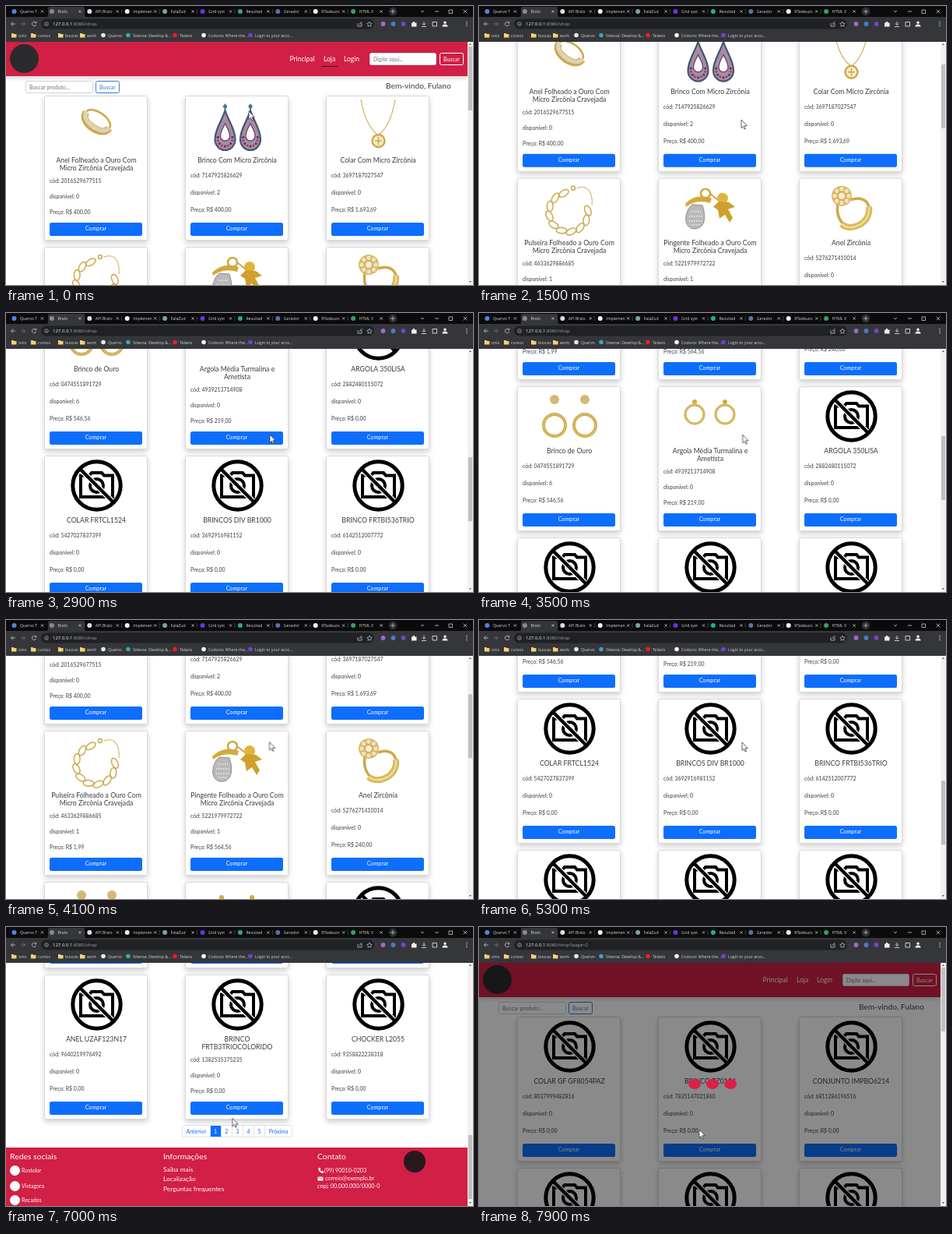
Animation, 600 px wide and 358 px high, one loop 8000 ms. Source, as an HTML page:

```html
<!DOCTYPE html>
<html lang="pt-BR">
<head>
<meta charset="utf-8">
<title>Loja</title>
<style>
@property --s { syntax: "<number>"; inherits: true; initial-value: 0; }
html, body { margin: 0; width: 100%; height: 100%; overflow: hidden; background: #fff; }
#stage { position: absolute; left: 0; top: 0; width: 600px; height: 358px; overflow: hidden;
  font-family: Lato, "Open Sans", sans-serif; color: #383d43; animation: scroll 8s infinite; }
#stage div, #stage span, #stage svg { position: absolute; box-sizing: border-box; }
span { white-space: nowrap; line-height: 10px; margin-top: -5px; }
.mid { transform: translateX(-50%); }
.view { inset: 0 7px 0 0; clip-path: inset(45px 0 0); background: #fff; }
.page { inset: 0; transform: translateY(calc(var(--s) * -1px)); }
.first { animation: first 8s step-end infinite; }
.second { animation: second 8s step-end infinite; }

.head { left: 0; top: 45px; width: 593px; height: 45px; background: #d11f45; color: #fff; box-shadow: 0 2px 6px #0003; }
.field { border: .6px solid #ced4da; border-radius: 2.5px; background: #fff; }
.btn { border: .8px solid; border-radius: 2.5px; font-size: 7px; line-height: 14px; text-align: center; }
.card { width: 133px; height: 186px; border: .6px solid #d9d9dc; border-radius: 2.5px; background: #fff; box-shadow: 0 3px 7px #0003; }
.buy { left: 5.9px; top: 162.4px; width: 119px; height: 16.4px; border-radius: 2.5px; background: #0d6efd;
  color: #fff; font-size: 7.2px; line-height: 16px; text-align: center; }
.art { left: 0; top: 0; fill: none; }
.pager { left: 226px; top: 1084px; display: flex; width: 142px; height: 16px; border: .6px solid #dee2e6; border-radius: 2.5px; overflow: hidden; }
.pager b { flex: 1 0 auto; font: 7px/15px Lato, sans-serif; text-align: center; color: #0d6efd; border-left: .6px solid #dee2e6; }
.pager b:first-child { border: 0; }
.pager .on { background: #0d6efd; color: #fff; }
.foot { left: 0; top: 1113px; width: 593px; height: 80px; background: #d11f45; color: #fff; }
.shade { inset: 45px 0 0; background: rgba(0, 0, 0, .46); }
.dot { top: 194.5px; width: 16px; height: 13px; border-radius: 50%; background: #dc1f45; }
.bar { left: 593px; top: 45px; width: 7px; height: 313px; background: #f1f1f1; }
.thumb { left: 1px; top: 7px; width: 5px; height: 82px; background: #bfbfbf; transform: translateY(calc(var(--s) * .259px)); }
.cursor { left: 0; top: 0; overflow: visible; animation: cursor 8s infinite; }
.chrome { left: 0; top: 0; font: 5.2px "Open Sans", "Noto Sans", sans-serif; }

@keyframes scroll {
  0%     { --s: 0; animation-timing-function: step-end; }
  5%     { --s: 0; animation-timing-function: steps(5); }
  11.25% { --s: 60; animation-timing-function: steps(6); }
  18.75% { --s: 88.3; animation-timing-function: steps(4); }
  23.75% { --s: 140; animation-timing-function: steps(5); }
  30%    { --s: 380; animation-timing-function: steps(5); }
  36.25% { --s: 514; animation-timing-function: steps(3); }
  40%    { --s: 530; animation-timing-function: steps(9); }
  51.25% { --s: 167; animation-timing-function: steps(2); }
  53.75% { --s: 155; animation-timing-function: steps(10); }
  66.25% { --s: 596; animation-timing-function: steps(6); }
  73.75% { --s: 818; animation-timing-function: steps(1); }
  75%    { --s: 830; animation-timing-function: step-end; }
  92.5%, 100% { --s: 0; animation-timing-function: step-end; }
}
@keyframes cursor {
  0%     { transform: translate(312px, 135px); animation-timing-function: steps(9); }
  11.25% { transform: translate(336px, 146px); animation-timing-function: steps(6); }
  18.75% { transform: translate(337px, 146px); animation-timing-function: steps(14); }
  36.25% { transform: translate(339px, 156px); animation-timing-function: steps(24); }
  66.25%, 80% { transform: translate(338px, 157px); animation-timing-function: steps(7); }
  88.75%, 100% { transform: translate(283px, 260px); }
}
@keyframes first { 0% { visibility: visible; } 92.5%, 100% { visibility: hidden; } }
@keyframes second { 0% { visibility: hidden; } 92.5%, 100% { visibility: visible; } }
</style>
</head>
<body>
<div id="stage"></div>
<script>
const span = (x, y, size, text, cls = '', color = '') =>
  `<span class="${cls}" style="left:${x}px;top:${y}px;font-size:${size}px;color:${color}">${text}</span>`;
const box = (cls, x, y, w, h, inner = '', extra = '') =>
  `<div class="${cls}" style="left:${x}px;top:${y}px;width:${w}px;height:${h}px;${extra}">${inner}</div>`;
const repeat = (n, f) => Array.from({ length: n }, (_, i) => f(i)).join('');
const circle = (x, y, r, attrs) => `<circle cx="${x}" cy="${y}" r="${r}" ${attrs}/>`;
const path = (d, attrs) => `<path d="${d}" ${attrs}/>`;

const gold = 'stroke="#cda94c"';

const drop = x =>
  path(`M${x} 9l3 4-3 4-3-4z`, 'fill="#3f7f95"') +
  path(`M${x} 18C${x + 4} 31 ${x + 13} 42 ${x + 13} 55A13 14 0 0 1 ${x - 13} 55C${x - 13} 42 ${x - 4} 31 ${x} 18z`,
    'fill="#a58ca6" stroke="#43566e" stroke-width="2.2"') +
  path(`M${x} 35c3 6 6 10 6 16a6 6 0 0 1-12 0c0-6 3-10 6-16z`, 'fill="#fff" stroke="#6b3f63" stroke-width="1.3"') +
  repeat(9, i => {
    const a = (i * 25 - 10) * Math.PI / 180;
    return circle(x + 9.4 * Math.cos(a), 54 + 10 * Math.sin(a), 1.5, `fill="${i % 2 ? '#b8336f' : '#57334f'}"`);
  });

const hoop = (x, y, r, w) => circle(x, y, r, `${gold} stroke-width="${w}"`) +
  circle(x, y, r, 'stroke="#f3dfa0" stroke-width="1.4" stroke-dasharray="1 1.6"');

const art = {
  none: () => circle(66.5, 37.5, 30.7, 'stroke="#000" stroke-width="5"') +
    path('M46 24.500H57L60 21H73L76 24.500H87V52H46z', 'stroke="#000" stroke-width="4"') +
    circle(66.5, 37.5, 8.5, 'stroke="#000" stroke-width="4"') +
    path('M48 19L85 56', 'stroke="#fff" stroke-width="7"') +
    path('M45 16L88 59', 'stroke="#000" stroke-width="4.4"'),
  band: () => '<g transform="rotate(35 66 33)">' +
    `<ellipse cx="66" cy="29" rx="18" ry="9" ${gold} stroke-width="2.5"/>` +
    path('M48 30C48 46 84 46 84 30', 'stroke="#cda94c" stroke-width="9"') +
    path('M48 29C48 44 84 44 84 29', 'stroke="#e4e2dc" stroke-width="5.5" stroke-dasharray="1.6 .6"') + '</g>',
  drops: () => drop(50.5) + drop(83),
  chain: () => path('M44 4C48 28 56 42 66 50C77 42 84 28 88 4', `${gold} stroke-width="1.1"`) +
    circle(66.5, 57, 8, `${gold} stroke-width="2.4" fill="#f6ebc9"`) +
    path('M62 57h9M66.500 52v10', `${gold} stroke-width="1.5"`),
  bracelet: () => repeat(10, i =>
    `<ellipse rx="6.8" ry="3.8" transform="translate(65 43) rotate(${i * 29 - 5}) translate(25 0) rotate(72)"
      ${gold} stroke-width="1.5"/>`) +
    path('M76 12Q90 7 94 21Q96 28 95 34', `${gold} stroke-width="1.3" stroke-dasharray="2 .8"`) +
    circle(71, 12, 2.5, `${gold} stroke-width="1.4"`),
  pacifier: () => path('M34 32Q48 18 68 25L66 31Q48 26 35 36z', 'fill="#d4aa35"') +
    circle(60, 19, 6, `${gold} stroke-width="2.6"`) +
    path('M43 33C34 40 30 60 43 64C58 66 62 52 56 34z', 'fill="#b9b9ba" stroke="#8c8c8e"') +
    path('M41 42h13M39 48h18M39 54h18M42 59h12', 'stroke="#eee" stroke-width="1.5" stroke-dasharray="1.5 1.5"') +
    path('M66 19L77 28', `${gold} stroke-width="2"`) +
    circle(82, 25, 7, 'fill="#dfb63d"') +
    path('M77 29L70 36L76 40L78 51L85 46L91 56L95 50L89 39L98 36L90 30z', 'fill="#cfa02d"'),
  flower: () => path('M49 32C46 50 56 64 70 63C88 60 96 44 86 30C82 25 74 24 66 27', `${gold} stroke-width="3.5"`) +
    path('M54 58C64 69 92 58 89 36', 'stroke="#d8b85c" stroke-width="8"') +
    path('M54 58C64 69 92 58 89 36', 'stroke="#f0dc94" stroke-width="2.5"') +
    circle(54, 22, 13, 'fill="#dfbd62"') +
    repeat(8, i => circle(54 + 9 * Math.cos(i * .785), 22 + 9 * Math.sin(i * .785), 3.4, 'fill="#f1e2bd" stroke="#c79d3c" stroke-width=".7"')) +
    circle(54, 22, 4.5, 'fill="#f5edda" stroke="#c79d3c" stroke-width=".7"'),
  studs: () => [47, 86].map(x => circle(x, 16, 6, 'fill="#d5b878"') + hoop(x, 49, 14, 4)).join(''),
  hoops: () => [46, 85].map(x => circle(x, 19, 3, 'fill="#d4aa3c"') + hoop(x, 35, 12, 3)).join(''),
};

const plated = ' Folheado a Ouro Com|Micro Zircônia Cravejada';
const shop = [
  ['Anel' + plated, '2016529677515', 0, '400,00', 'band'],
  ['Brinco Com Micro Zircônia', '7147925826629', 2, '400,00', 'drops'],
  ['Colar Com Micro Zircônia', '3697187027547', 0, '1.693,69', 'chain'],
  ['Pulseira' + plated, '4633629886685', 1, '1,99', 'bracelet'],
  ['Pingente' + plated, '5221979972722', 1, '564,56', 'pacifier'],
  ['Anel Zircônia', '5276271410014', 0, '240,00', 'flower'],
  ['Brinco de Ouro', '0474551891729', 6, '546,56', 'studs'],
  ['Argola Média Turmalina e|Ametista', '4939213714908', 0, '219,00', 'hoops'],
  ['ARGOLA 350LISA', '2882480115072'],
  ['COLAR FRTCL1524', '5427027837399'],
  ['BRINCOS DIV BR1000', '3692916981152'],
  ['BRINCO FRTBI536TRIO', '6142512007772'],
  ['ANEL UZAF123N17', '9640219976492'],
  ['BRINCO|FRTB3TRIOCOLORIDO', '1382535375235'],
  ['CHOCKER L2055', '9358822238318'],
];
const shop2 = [
  ['COLAR GF GF8054PAZ', '8037999482816'],
  ['BRINCO BZ0124', '7835147021860'],
  ['CONJUNTO IMPBO6214', '6811286196516'],
  ['COLAR GF GF8061', '8037999482823'],
  ['BRINCO BZ0130', '7835147021877'],
  ['CONJUNTO IMPBO6220', '6811286196523'],
];

function card([name, code, stock = 0, price = '0,00', kind = 'none'], i) {
  const lines = name.split('|');
  const ys = lines.length > 1 ? [108.2, 128, 147.8] : [101, 123, 145.2];
  const facts = [`cód: ${code}`, `disponível: ${stock}`, `Preço: R$ ${price}`];
  return box('card', 49 + i % 3 * 181, 115 + Math.floor(i / 3) * 194, 133, 186,
    `<svg class="art" width="133" height="75">${art[kind]()}</svg>` +
    lines.map((t, k) => span(66, 81.5 + k * 10.2, 8.7, t, 'mid')).join('') +
    facts.map((t, k) => span(6.1, ys[k], 6.9, t)).join('') +
    '<div class="buy">Comprar</div>');
}

const header = active => `<div class="head">
  ${box('', 5, 4, 37, 37, '', 'border-radius:50%;background:#2b2a2c')}
  ${span(364.5, 22.5, 8.5, 'Principal')}${span(408, 22.5, 8.5, 'Loja')}${span(434, 22.5, 8.5, 'Login')}
  ${active ? box('', 405, 31.5, 22, 1, '', 'background:#4a1420') : ''}
  ${box('field', 467, 14.5, 86, 16)}${span(472, 22.5, 7, 'Digite aqui...', '', '#70767c')}
  ${box('btn', 557, 14.5, 31, 16, 'Buscar')}</div>
  ${box('field', 25, 96, 86.5, 16)}${span(30, 104, 7, 'Buscar produto...', '', '#70767c')}
  ${box('btn', 115, 96, 31, 16, 'Buscar', 'color:#3d7fc9')}
  ${span(488, 102, 10.2, 'Bem-vindo, Fulano')}`;

const social = (y, name) =>
  box('', 5, y - 6.5, 13, 13, '', 'border-radius:50%;background:#fff') + span(20, y, 7, name);

const footer = `<div class="foot">
  ${span(5, 10.5, 10.4, 'Redes sociais')}${span(202, 10.5, 10.4, 'Informações')}${span(400, 10.5, 10.4, 'Contato')}
  ${social(29, 'Rostolar')}${social(49, 'Vistagora')}${social(67, 'Recados')}
  ${['Saiba mais', 'Localização', 'Perguntas frequentes'].map((t, i) => span(202, 27.5 + i * 12.5, 8.4, t)).join('')}
  <svg width="593" height="60" fill="#fff">
    <path d="M401 27l2-1.5 1.4 2-1 1.2 2 2 1.2-1 2 1.4-1.5 2q-5-1-6.1-6.1zM400.500 37.500h7v5h-7z"/>
    <path d="M400.500 37.500l3.500 3 3.500-3" fill="none" stroke="#d11f45" stroke-width=".7"/>
  </svg>
  ${span(409, 29.5, 7.2, '(99) 90010-0203')}${span(410, 40, 7.2, 'correio@exemplo.br')}${span(400, 49.5, 7.2, 'cnpj: 00.000.000/0000-0')}
  ${box('', 511, 4, 28, 28, '', 'border-radius:50%;background:#29191d')}</div>`;

const pager = '<div class="pager">' + ['Anterior', 1, 2, 3, 4, 5, 'Próxima']
  .map(t => `<b class="${t === 1 ? 'on' : ''}">${t}</b>`).join('') + '</div>';

// Browser frame
const label = (x, y, text) => `<text x="${x}" y="${y}" fill="#d5d6d8">${text}</text>`;
const line = (d, color = '#c9cacc') => path(d, `fill="none" stroke="${color}" stroke-width=".8"`);
const cross = (x, y, r) => line(`M${x - r} ${y - r}l${2 * r} ${2 * r}M${x + r} ${y - r}l${-2 * r} ${2 * r}`);

const tabs = [['Quervo T', '#4c86e8'], ['Bralo', '#8a8a8a'], ['API Bralo', '#dddddd'], ['Implemen', '#f2f2f2'],
  ['FalaZud', '#74aa9c'], ['Grid syst', '#6f2cf3'], ['Resultad', '#20b08b'], ['Gerador', '#5374a8'],
  ['RTadeuzo', '#f2f2f2'], ['HTML V', '#2fa36b']];
const tabBar = tabs.map(([name, color], i) => {
  const x = 10.5 + i * 48.4;
  return circle(x, 7, 3, `fill="${color}"`) + label(x + 7.5, 9, name) +
    cross(x + 36, 7, 1.6) + (i > 1 ? line(`M${x - 7} 4v6`, '#4b4c50') : '');
}).join('');

const folders = [[10, 'onix'], [35, 'cursos'], [70, 'buscas'], [98, 'work']].map(([x, t]) =>
  path(`M${x - 3} 35h2.500l1 1h3v4.500h-6.500z`, 'fill="#f3d272"') + label(x + 6, 39.5, t)).join('');
const links = [[125, 'Quervo', '#e8e8e8'], [157, 'Sitevoa: Develop &amp;...', '#32a9b5'], [217, 'Telavix', '#f01d1d'],
  [254, 'Coduno: Where the...', '#f2f2f2'], [314, 'Login to your acco...', '#7441d8']].map(([x, t, c]) =>
  circle(x, 37.5, 2.8, `fill="${c}"`) + label(x + 6, 39.5, t)).join('');

const badges = ['#a06ad0', '#4a7bd0', '#7446c8'].map((c, i) => circle(484.5 + i * 13, 23, 2.9, `fill="${c}"`)).join('');

const address = `<rect x="45" y="16.500" width="428" height="13" rx="6.500" fill="#202124"/>` +
  line('M12 23H6.500M9 20.500L6.500 23 9 25.500') + line('M19 23h5.500M22 20.500l2.500 2.500-2.500 2.500', '#77787a') +
  line('M38.500 21.500A2.700 2.700 0 1 0 38.700 24M38.800 20v2h-2') +
  circle(52, 23, 2.3, 'fill="none" stroke="#b5b6b8" stroke-width=".7"') + line('M52 22.700v1.500') +
  `<text x="60" y="25.200" font-size="6" fill="#f1f1f1">127.0.0.1<tspan fill="#a1a3a6">:8080/shop</tspan><tspan class="second" fill="#a1a3a6">?page=2</tspan></text>` +
  line('M452 22v4h5v-4M454.500 24q0-3 3-3.500') +
  path('M467 20l1 2.200 2.300.2-1.700 1.600.5 2.300-2.100-1.200-2.100 1.200.5-2.300-1.700-1.600 2.300-.2z', 'fill="none" stroke="#c9cacc" stroke-width=".7"') +
  badges + path('M521 21.500h2v-1.500h2v1.500h2.500v5h-6.500z', 'fill="#f1f1f1"') +
  line('M537 20v4M535 22.500l2 2 2-2M534 26.500h6', '#f1f1f1') + line('M548 20.500h5.500v5.500h-5.500z', '#f1f1f1') +
  circle(564, 21.3, 1.7, 'fill="#f1f1f1"') + path('M560.500 26.500q0-3 3.500-3t3.500 3z', 'fill="#f1f1f1"') +
  [20.5, 23, 25.5].map(y => circle(592, y, .7, 'fill="#ddd"')).join('');

const chrome = `<svg class="chrome" width="600" height="45.500">
  <rect width="600" height="46" fill="#35363a"/><rect width="600" height="14" fill="#0b0b0c"/>
  <path d="M52 14q2 0 2-3V3q0-2 2-2h43q2 0 2 2v8q0 3 2 3z" fill="#35363a"/>
  ${tabBar}${circle(497, 7, 5.5, 'fill="#2b2c2f"')}${line('M497 4v6M494 7h6')}
  ${line('M533 6l2 2 2-2M551 7h5M569 5h4.500v4.500h-4.500z')}${cross(590, 7, 2.3)}
  ${address}${folders}${links}</svg>`;

document.getElementById('stage').innerHTML = `
  <div class="view">
    <div class="page first">${header(true)}${shop.map(card).join('')}${pager}${footer}</div>
    <div class="page second">${header(false)}${shop2.map(card).join('')}</div>
    <div class="second" style="inset:0"><div class="shade"></div>
      ${[269, 292, 315].map(x => `<div class="dot" style="left:${x}px"></div>`).join('')}</div>
  </div>
  <div class="bar"><div class="thumb"></div>
    <svg width="7" height="313" fill="#555"><path d="M2 5l1.500-2L5 5zM2 308l1.500 2 1.500-2z"/></svg></div>
  ${chrome}
  <svg class="cursor" width="9" height="13"><path d="M0 0V10.500L2.400 8.300 4 12 5.600 11.300 4 7.700H7.300z" fill="#fff" stroke="#222" stroke-width=".7"/></svg>`;
</script>
</body>
</html>
```
